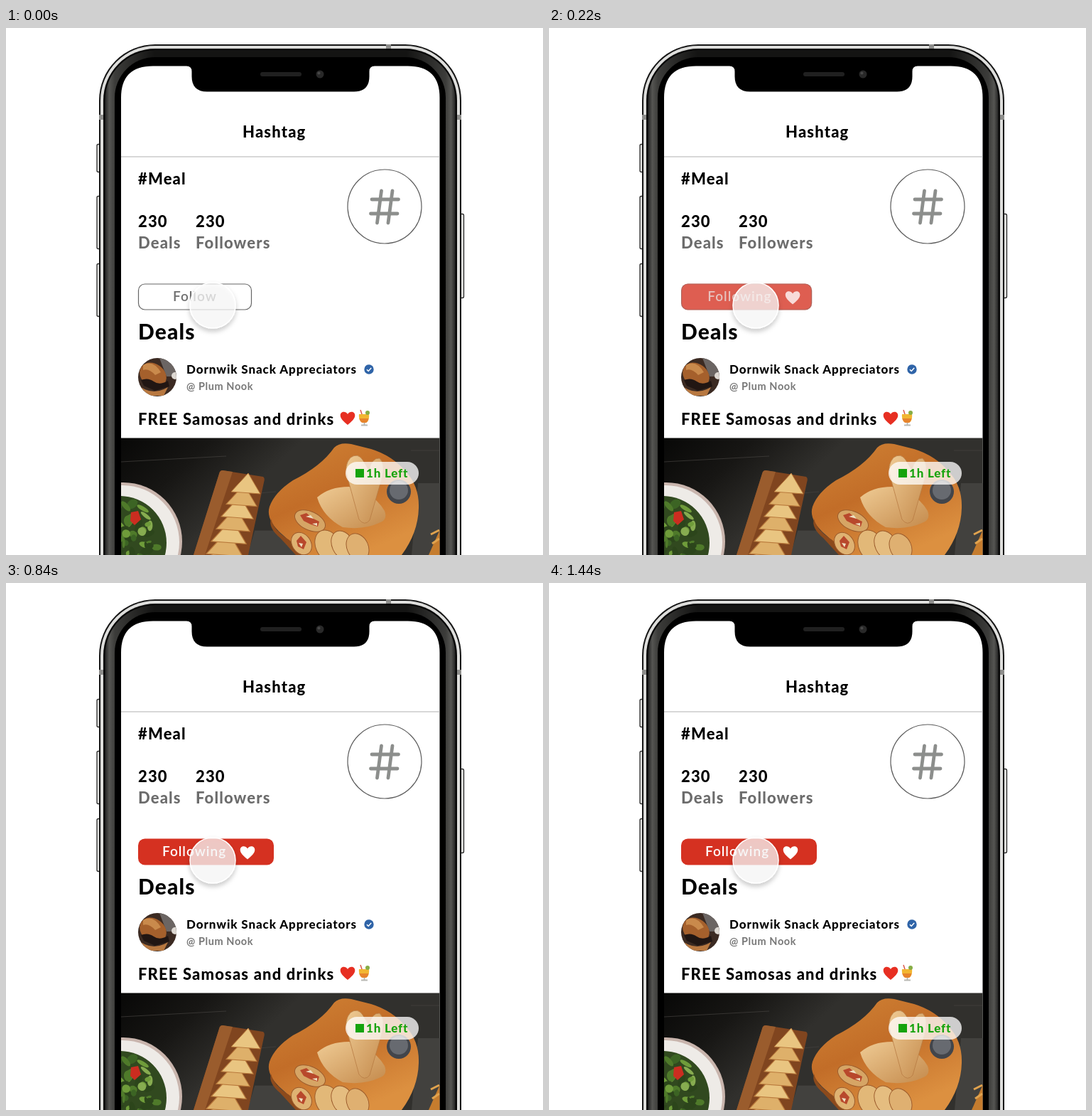
Recreate the animation shown at these times as an HTML page. Size 756x741 px, loop 1.68 s.

```html
<!DOCTYPE html>
<html lang="en">
<head>
<meta charset="utf-8">
<title>Follow button</title>
<style>
  html, body { margin: 0; width: 100%; height: 100%; overflow: hidden; background: #fff; }
  svg { display: block; width: 100%; height: 100%; }
  text { font: 800 22px Lato, "Open Sans", sans-serif; letter-spacing: 1.15px; }
  .grey { fill: #6c6c6c; }
  .title { font-size: 30px; }
  .name { font-size: 17px; letter-spacing: .9px; }
  .place { font-size: 14.5px; font-weight: 700; letter-spacing: .6px; fill: #777; }
  .tag { font-size: 17px; letter-spacing: .8px; fill: #16a30c; }
  .label { font-size: 19px; font-weight: 600; letter-spacing: 1px; }
</style>
</head>
<body>
<svg viewBox="0 0 756 741">
  <defs>
    <linearGradient id="side">
      <stop offset="0" stop-color="#252525"/><stop offset=".012" stop-color="#555552"/>
      <stop offset=".028" stop-color="#3c3c3a"/><stop offset=".14" stop-color="#141413"/>
      <stop offset=".86" stop-color="#141413"/><stop offset=".972" stop-color="#3c3c3a"/>
      <stop offset=".988" stop-color="#555552"/><stop offset="1" stop-color="#252525"/>
    </linearGradient>
    <linearGradient id="table" x2="1" y2=".4">
      <stop offset="0" stop-color="#080807"/><stop offset=".25" stop-color="#171614"/><stop offset=".5" stop-color="#31302d"/>
    </linearGradient>
    <linearGradient id="board" x2=".6" y2="1">
      <stop offset="0" stop-color="#d18436"/><stop offset=".5" stop-color="#c26d28"/><stop offset="1" stop-color="#dc9040"/>
    </linearGradient>
    <linearGradient id="bread" x2="1" y2="1">
      <stop offset="0" stop-color="#efcb94"/><stop offset="1" stop-color="#c48a4c"/>
    </linearGradient>
    <filter id="shadow" x="-30%" y="-30%" width="160%" height="170%">
      <feDropShadow dx="0" dy="4" stdDeviation="3" flood-color="#000" flood-opacity=".26"/>
    </filter>
    <clipPath id="photo"><path d="M162 576.500H610.500V741H162z"/></clipPath>
    <clipPath id="face"><circle cx="213" cy="491" r="27"/></clipPath>
    <path id="heart" d="M0 9C-6 4-10.300 0-10.300-4.300C-10.300-10-3-11 0-6C3-11 10.300-10 10.300-4.300C10.300 0 6 4 0 9z"/>
  </defs>

  <!-- Phone -->
  <g fill="#e4e4e2" stroke="#2a2a2a" stroke-width="1.300">
    <rect x="128" y="163.500" width="8" height="39" rx="2"/>
    <rect x="128" y="236.500" width="8" height="74" rx="2"/>
    <rect x="128" y="331.500" width="8" height="74" rx="2"/>
    <rect x="636" y="261.500" width="8.500" height="118" rx="2"/>
  </g>
  <rect x="131" y="23" width="510" height="900" rx="79" fill="#161616"/>
  <rect x="133" y="25" width="506" height="900" rx="77" fill="#dededc"/>
  <path d="M131 122h8v7h-8zM633 122h8v7h-8zM535 23h7v8h-7z" fill="#8d8d8b"/>
  <rect x="137" y="29" width="498" height="900" rx="73" fill="#080808"/>
  <rect x="139.500" y="31.500" width="493" height="900" rx="70" fill="url(#side)"/>
  <rect x="153" y="41" width="466" height="900" rx="57" fill="#000"/>
  <path d="M162 741V98Q162 53.500 207 53.500H254Q261.500 53.500 261.500 61V68Q261.500 89.500 283 89.500H490Q511.500 89.500 511.500 68V61Q511.500 53.500 519 53.500H565.500Q610.500 53.500 610.500 98V741z" fill="#fff"/>
  <rect x="358" y="62" width="58" height="6" rx="3" fill="#202020"/>
  <circle cx="442" cy="65" r="5.500" fill="#292929"/><circle cx="440.500" cy="63.500" r="2" fill="#484848"/>

  <!-- Page -->
  <text x="333" y="154">Hashtag</text>
  <path d="M162 181H610.500" stroke="#b0b0b0"/>
  <text x="186" y="220">#Meal</text>
  <text x="186" y="280">230</text><text x="267" y="280">230</text>
  <text x="186" y="310" class="grey">Deals</text><text x="267" y="310" class="grey">Followers</text>
  <circle cx="533" cy="251" r="52" fill="none" stroke="#5c5c5c" stroke-width="1.200"/>
  <path d="M528.500 229L522.500 274M544 229L538 274M515 241H552.500M513.500 261H551" stroke="#8c8e8c" stroke-width="4.800" stroke-linecap="round"/>
  <text x="186" y="438" class="title">Deals</text>

  <!-- Avatar -->
  <g clip-path="url(#face)">
    <path d="M186 464h54v54h-54z" fill="#3b2a22"/>
    <path d="M216 464h24v26h-14z" fill="#6b6563"/>
    <circle cx="238" cy="489" r="5" fill="#ddd8d2"/>
    <ellipse cx="207" cy="488" rx="20" ry="16" fill="#a5602c" transform="rotate(35 207 488)"/>
    <path d="M193 474q14-8 25 10l-8 4q-9-10-17-7z" fill="#c98a4c"/>
    <path d="M190 495q10-4 18 2t20-1l2 8-20 6-16-7z" fill="#211613"/>
    <path d="M190 505q18 12 38 0l-6 12h-22z" fill="#b87840"/>
  </g>
  <text x="254" y="486" class="name">Dornwik Snack Appreciators</text>
  <circle cx="511" cy="480" r="6.700" fill="#2f64a8"/>
  <path d="M508 480.200l2.200 2.300 4-4.500" fill="none" stroke="#fff" stroke-width="1.500"/>
  <text x="254" y="509" class="place">@ Plum Nook</text>
  <text x="186" y="558">FREE Samosas and drinks</text>
  <use href="#heart" x="481" y="549" fill="#e72f22"/>
  <path d="M502 546l-3-9" stroke="#d9574a" stroke-width="1.500"/>
  <path d="M497 543h14q1 9-4 12h-5q-6-3-5-12z" fill="#f2b632"/>
  <path d="M497.500 549h13q-1 5-4 6h-5q-3-1-4-6z" fill="#e7842c"/>
  <path d="M500 558.500h9M504.500 555v3" stroke="#b9b9b4" stroke-width="2"/>
  <circle cx="509" cy="541" r="3" fill="#86ad45"/>

  <!-- Photo -->
  <g clip-path="url(#photo)">
    <path d="M162 576H611V741H162z" fill="url(#table)"/>
    <path d="M350 707h82v34h-92zM580 640h31v101h-40z" fill="#42413e"/>
    <path d="M162 610l148-8M345 655l35-3M350 707h40M570 594h40" stroke="#45433f" stroke-width=".7"/>
    <circle cx="165" cy="722" r="83" fill="#c9b5ad"/>
    <circle cx="164" cy="723" r="80" fill="#eeebe7"/>
    <circle cx="160" cy="724" r="66" fill="#31491f"/>
    <g id="salad"></g>
    <path d="M176 681l10-2 4 12-9 8-6-6z" fill="#cb2d20"/>
    <path d="M305 622l57 9q3 2 1 8l-22 102h-77l36-114q1-5 5-5z" fill="#80451f"/>
    <path d="M305 622l14 2-39 117h-16l36-114q1-5 5-5z" fill="#9a5c2d"/>
    <g id="samosas" stroke="#b9793b"></g>
    <path d="M462 590q8-8 24-5l28 7q30 9 50 33 18 20 17 50-1 35-24 66H418q-11-13-28-28-25-21-19-40 7-20 33-37 40-20 58-46z" fill="url(#board)"/>
    <path d="M373 690q4 17 26 30l21 21h-12l-22-24q-17-14-13-27z" fill="#8c4a1c"/>
    <circle cx="553" cy="652" r="17" fill="#42454b"/><circle cx="553" cy="650" r="13" fill="#676a70"/>
    <path d="M438 660q17-15 45-15 35 8 50 34 5 13-8 17-21 10-51 6-28-15-36-42z" fill="url(#bread)"/>
    <path d="M485 604q10-7 17 3l9 15q4-18 15-17 9 8 2 32l-16 55q-7 9-15-1l-16-58q-6-18 4-29z" fill="url(#bread)" stroke="#b87b43" stroke-width=".8"/>
    <g stroke="#9c5c2c">
      <ellipse cx="428" cy="693" rx="23" ry="13" transform="rotate(25 428 693)" fill="#d6a565"/>
      <ellipse cx="416" cy="725" rx="13" ry="17" transform="rotate(-35 416 725)" fill="#dfb272"/>
      <ellipse cx="453" cy="728" rx="17" ry="23" transform="rotate(-25 453 728)" fill="#e2b878"/>
      <ellipse cx="474" cy="727" rx="15" ry="21" transform="rotate(-25 474 727)" fill="#e5bd80"/>
      <ellipse cx="495" cy="730" rx="15" ry="20" transform="rotate(-25 495 730)" fill="#dfb071"/>
    </g>
    <path d="M414 685l9-3 8 7 10 5-2 7-10-3-10-5zM409 721l6-7 8 9-4 10-8-4z" fill="#b8482c"/>
    <path d="M422 687l7-2 4 5zM431 697l7-1v4zM412 724l6 1-2 5z" fill="#eee0c2"/>
    <path d="M595 741l16-36v36z" fill="#c57c2e"/><path d="M598 712l12-6M600 725l10-7" stroke="#e1a34e" stroke-width="3"/>
  </g>
  <rect x="478" y="610" width="103" height="32" rx="16" fill="#fff" fill-opacity=".76"/>
  <path d="M492 620h12v12h-12z" fill="#16a30c"/>
  <text x="507" y="632" class="tag">1h Left</text>

  <!-- Button and touch -->
  <rect id="fill" x="186" y="359.500" height="37" rx="9.500" fill="#d53121"/>
  <rect id="edge" x="186.500" y="360" height="36" rx="9" fill="none" stroke="#666" stroke-width="1.200"/>
  <text id="follow" y="384" class="label" fill="#707070">Follow</text>
  <text id="following" y="384" class="label" fill="#fff">Following</text>
  <use id="love" href="#heart" y="379.500" fill="#fff"/>
  <circle cx="291" cy="390" r="32" fill="#fdfdfd" fill-opacity=".72" stroke="#fff" stroke-width="1.500" filter="url(#shadow)"/>
</svg>
<script>
  const LOOP = 1680, START = 40, END = 300;
  const el = id => document.getElementById(id);
  const set = (id, attrs) => {
    for (const key in attrs) el(id).setAttribute(key, attrs[key]);
  };
  const mix = (a, b, p) => a + (b - a) * p;

  let seed = 11;
  const random = () => (seed = seed * 16807 % 2147483647) / 2147483647;

  const greens = ['#4f7a2a', '#6f9c3a', '#2c451b', '#87ac50', '#3c6424'];
  let leaves = '';
  for (let i = 0; i < 90; i++) {
    const angle = random() * 6.283, r = Math.sqrt(random()) * 59;
    const x = 160 + r * Math.cos(angle), y = 724 + r * Math.sin(angle);
    leaves += `<ellipse cx="${x}" cy="${y}" rx="${4 + random() * 6}" ry="${2 + random() * 4}"
      fill="${greens[i % 5]}" transform="rotate(${random() * 180} ${x} ${y})"/>`;
  }
  el('salad').innerHTML = leaves;

  let pastries = '';
  for (let i = 6; i >= 0; i--) {
    const size = 1 + i * 0.05;
    pastries += `<path d="M4-17L21 12L-20 9z" fill="${i % 2 ? '#deb06a' : '#e9c581'}"
      transform="translate(${337 - i * 6} ${643 + i * 17}) scale(${size})"/>`;
  }
  el('samosas').innerHTML = pastries;

  function draw(now) {
    const t = Math.min(1, Math.max(0, (now % LOOP - START) / (END - START)));
    const p = t * t * (3 - 2 * t);
    const x = mix(235, 220, p);
    set('fill', { width: mix(160, 191, p), opacity: p });
    set('edge', { width: mix(159, 190, p), opacity: 1 - p * p });
    set('follow', { x, opacity: 1 - p });
    set('following', { x, opacity: p * p });
    set('love', { x: mix(354, 340, p), opacity: p });
  }

  const begin = performance.now();
  function tick() {
    draw(performance.now() - begin);
    requestAnimationFrame(tick);
  }
  tick();
</script>
</body>
</html>
```
